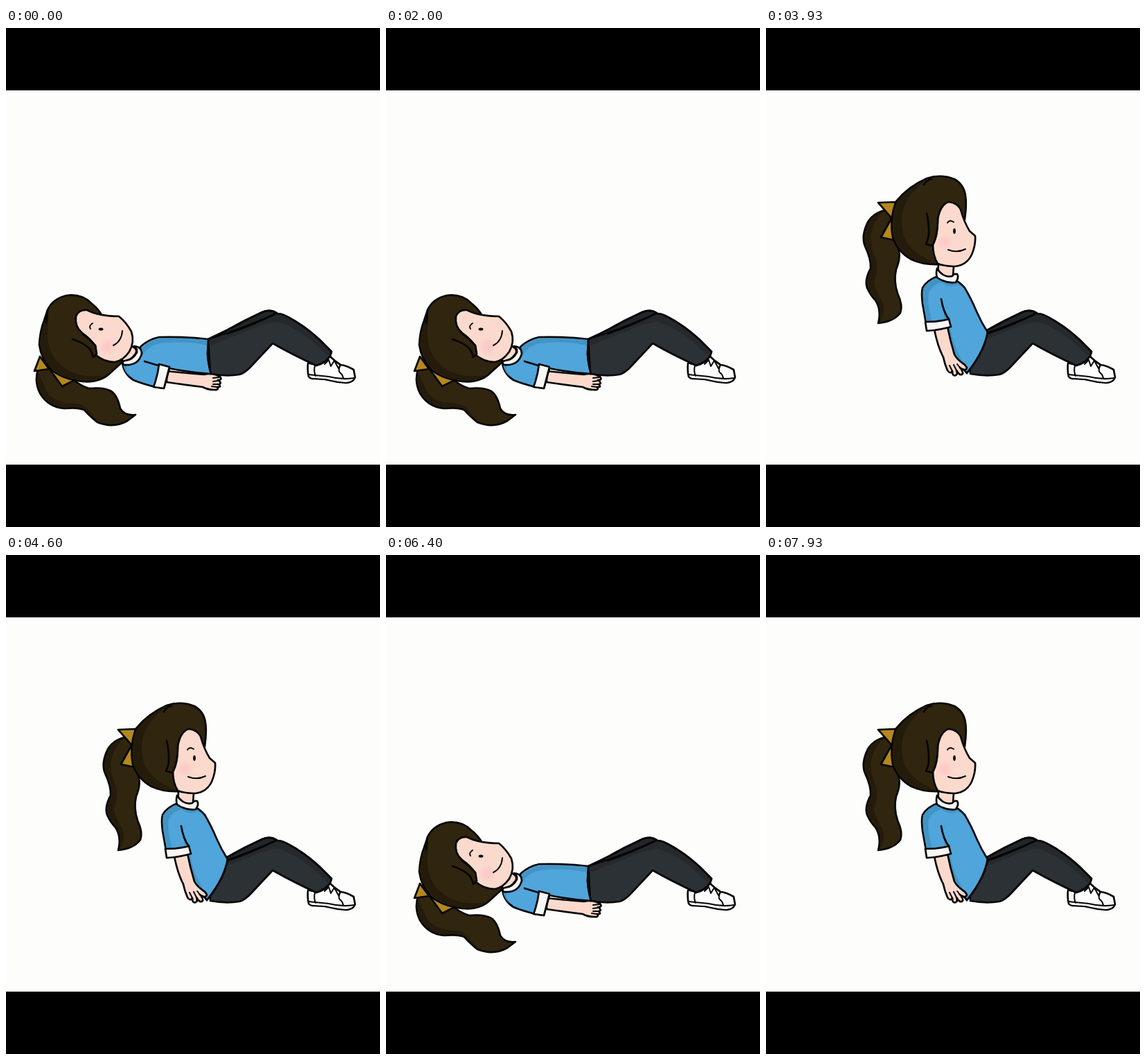
These frames come from a looping animation (540x720 px, 8 s). An HTML page:

```html
<!DOCTYPE html>
<html lang="en">
<head>
<meta charset="utf-8">
<title>Sit-ups</title>
<style>
  html, body { margin: 0; width: 100%; height: 100%; overflow: hidden; background: #000; }
  svg { display: block; width: 100vw; height: 100vh; }
  path, ellipse { stroke: #060606; stroke-width: 2.7; stroke-linejoin: round; stroke-linecap: round; fill: none; }
  .hair { fill: #30250f; }
  .bow { fill: #b5881c; }
  .skin { fill: #fbdacd; }
  .shirt { fill: #50a5db; }
  .trim { fill: #f7f7f5; }
  .pants { fill: #2b3134; }
  .far { fill: #212628; }
  .shoe { fill: #fdfdfd; }
  .shade { stroke: none; }
  .blue { fill: #4394c6; }
  .dark { fill: #241b0b; }
  .dim { fill: #25292c; }
  .blush { fill: #fcc9c8; stroke: none; }
  .eye { fill: #060606; stroke: none; }
  .thin { stroke-width: 2; }
</style>
</head>
<body>
<svg viewBox="0 0 540 720">
  <defs>
    <filter id="soft" x="-50%" y="-50%" width="200%" height="200%"><feGaussianBlur stdDeviation="3"/></filter>
  </defs>
  <rect y="90" width="540" height="540" fill="#fdfdfc"/>

  <g id="legs">
    <path class="shoe" d="M436 484Q435 495 437 503Q439 506 445 506L461 507Q476 511 491 512Q502 511 504 504L502 493Q492 487 483 486Q475 481 468 474L448 486Z"/>
    <path class="trim shade" d="M438 501L446 502L462 503L502 505Q500 510 491 511Q477 510 461 506L444 505Q439 505 438 501Z"/>
    <path class="trim shade" d="M437 485L446 487L446 501L438 500Z"/>
    <path class="thin" d="M437 500L446 501Q457 502 466 503Q485 508 503 505M446 487Q444 495 447 502M483 486Q479 494 482 497Q486 500 487 505M460 485L466 479L469 488L474 480L480 491L483 486"/>
    <path class="far" d="M292 449Q319 437 345 422L370 410Q382 405 392 412L350 440L296 480Z"/>
    <path class="pants" d="M292 449L320 440Q355 428 390 412Q398 412 407 417Q430 429 452 449L470 467L468 473Q462 483 448 487Q415 472 385 455Q369 472 355 487Q345 498 337 500Q318 503 295 499Z"/>
    <path class="shade dim" d="M294 450L320 441Q355 429 390 413Q399 413 407 418Q430 430 452 450L468 467L464 472L440 450Q414 430 393 424Q370 426 349 437Q320 448 296 458Z"/>
    <path d="M292 449Q319 437 345 422L370 410Q382 405 392 412M320 441Q355 429 390 412M391 412Q399 412 407 417Q430 429 452 449L470 467L468 473Q462 483 448 487"/>
  </g>

  <g id="lying">
    <path class="hair" d="M47 490Q40 509 49 527Q61 547 84 549Q104 547 113 551Q120 559 132 569Q155 578 175 567L187 558Q171 560 165 549Q161 530 152 524Q142 518 120 520Q109 517 98 508L62 484Z"/>
    <path class="shade dark" d="M47 498Q43 514 53 530Q65 547 85 547Q105 546 114 549Q130 566 145 571Q125 563 118 550Q110 541 89 541Q65 538 57 520Z"/>
    <path class="bow" d="M49 474L41 495L62 492ZM62 491L81 517L99 508Z"/>
    <path class="hair" d="M60 407Q67 391 87 386Q109 383 123 397Q131 403 137 412L168 482Q157 492 147 501Q133 512 110 510Q82 507 65 493Q51 478 48 457Q49 437 55 422Z"/>
    <path class="shade dark" d="M58 418Q49 438 49 457Q53 477 66 491Q83 505 110 509Q131 511 145 501Q115 506 91 495Q66 480 61 455Q58 437 62 414Z"/>
    <path d="M60 407L58 425"/>
    <path class="skin" d="M166 476L182 459Q191 464 187 470Q180 480 170 483Z"/>
    <path class="skin" d="M130 472L129 459Q122 448 110 440Q99 431 101 416Q105 406 117 407Q134 416 163 416Q174 425 181 438Q186 453 178 467Q169 480 157 482Q142 482 130 472Z"/>
    <ellipse class="blush" cx="147" cy="460" rx="9" ry="10" filter="url(#soft)"/>
    <path class="hair" d="M96 449Q112 454 121 463Q125 470 126 475L131 470L129 458Q121 449 110 441Z" style="stroke:none"/>
    <path d="M96 449Q112 454 121 463Q125 470 126 475L131 470L129 458Q121 449 110 441"/>
    <ellipse class="eye" cx="137" cy="434.5" rx="3.4" ry="2"/>
    <path class="thin" d="M125 426Q119 430 122 434M168 437Q167 452 155 458"/>

    <path class="skin" d="M232 495Q260 498 286 500Q298 497 309 503Q313 508 306 508Q313 513 307 514Q312 519 305 518Q308 523 300 522Q291 522 284 518Q260 515 232 511Z"/>
    <path class="thin" d="M308 504L299 505M306 509L299 510M306 514L299 514M304 518L297 517"/>
    <path class="shirt" d="M194 460Q206 449 221 446Q257 445 292 449L291 471Q292 484 296 499Q265 497 236 491L228 520L215 518Q193 512 184 508Q170 499 168 483Q187 483 194 470Z"/>
    <path class="shade blue" d="M196 462Q207 451 222 448Q257 447 291 450L291 458Q260 451 222 455Q206 458 197 472Q188 484 174 487Q173 497 180 504Q170 496 169 485Q185 484 194 471Z"/>
    <path d="M200 481L220 487"/>
    <path class="trim" d="M221 485L236 489L228 520L213 518Q219 502 221 485Z"/>
    <path class="trim" d="M185 459Q196 460 196 470Q191 488 170 486Q166 481 172 480Q183 479 189 468Q190 463 185 459Z"/>
    <path d="M292 449L291 470Q292 486 296 499"/>
  </g>

  <g id="sitting">
    <path class="hair" d="M177 262Q156 265 147 280Q137 300 143 315Q152 334 151 347Q142 364 146 375Q151 386 158 393Q167 407 162 426Q184 424 194 411Q198 400 190 383Q184 365 188 348Q196 329 190 315L186 306V262Z"/>
    <path class="shade dark" d="M169 265Q152 269 146 285Q139 302 145 315Q155 334 152 348Q143 364 148 375Q154 386 160 393Q168 406 165 424Q174 408 167 393Q156 377 156 366Q162 350 160 337Q151 318 151 300Q154 280 169 265Z"/>
    <path class="bow" d="M162 252L187 251L182 275ZM181 275L166 302L185 306Z"/>
    <path class="skin" d="M249 340L248 356Q260 364 270 358L271 343Z"/>
    <path class="hair" d="M188 250Q205 229 232 217Q252 210 272 218Q286 226 288 242Q290 255 287 276L250 341Q227 342 210 334Q190 323 183 302Q178 275 188 250Z"/>
    <path class="shade dark" d="M189 252Q204 232 230 220Q207 238 199 258Q192 279 200 303Q211 326 246 340Q226 340 211 333Q192 322 185 301Q180 275 189 252Z"/>
    <path d="M228 226Q232 219 239 218"/>
    <path class="skin" d="M241 313Q248 300 248 276Q252 254 264 251Q276 252 281 262Q286 280 294 293L302 300Q303 313 297 327Q290 342 273 344Q258 344 248 340Q241 329 241 313Z"/>
    <ellipse class="blush" cx="258" cy="309" rx="9" ry="8" filter="url(#soft)"/>
    <path class="hair" d="M232 268Q235 279 235 294Q235 304 231 312L240 314Q247 305 247 282L246 268Z" style="stroke:none"/>
    <path d="M232 268Q235 279 235 294Q235 304 231 312L240 314Q248 301 248 276"/>
    <ellipse class="eye" cx="272" cy="293" rx="1.9" ry="4"/>
    <path class="thin" d="M262 281Q265 276 271 280M263 320Q276 325 288 319"/>

    <path class="shirt" d="M248 358Q232 364 226 375Q224 382 226 398L232 432L258 431Q263 458 273 474Q280 487 290 498Q304 481 312 464Q318 451 320 439Q311 425 304 409Q296 390 287 375Q281 368 275 365Z"/>
    <path class="shade blue" d="M247 360Q233 365 227 376Q226 384 228 398L233 426L240 424Q232 396 235 382Q240 370 253 367Q267 376 277 370L286 376L275 366Q260 367 247 360Z"/>
    <path class="shade blue" d="M255 395Q258 414 265 422L266 433Q270 458 284 481L281 486L272 473Q264 455 259 431Z"/>
    <path class="trim" d="M247 347Q245 354 247 360Q260 369 274 367Q279 360 276 355Q271 354 269 358Q256 361 247 347Z"/>
    <path class="skin" d="M243 435Q248 460 256 475Q258 485 262 494Q266 500 269 495Q269 503 274 501Q277 500 275 494Q280 503 284 499Q285 496 280 490Q289 496 290 490Q287 485 283 483Q275 477 272 471Q266 451 262 431Z"/>
    <path class="thin" d="M269 495L265 487M275 494L271 486M280 490L276 485"/>
    <path class="trim" d="M230 424Q249 424 264 420L267 431Q250 436 232 437Z"/>
    <path d="M253 391Q256 410 264 420"/>
    <path d="M320 439Q318 451 312 464Q304 481 290 498"/>
  </g>
</svg>
<script>
  const CYCLE = 1600, LIE = 530;
  const lying = document.getElementById('lying');
  const sitting = document.getElementById('sitting');

  function draw(now) {
    const down = now % CYCLE < LIE;
    lying.style.display = down ? '' : 'none';
    sitting.style.display = down ? 'none' : '';
    requestAnimationFrame(draw);
  }
  draw(0);
</script>
</body>
</html>
```
